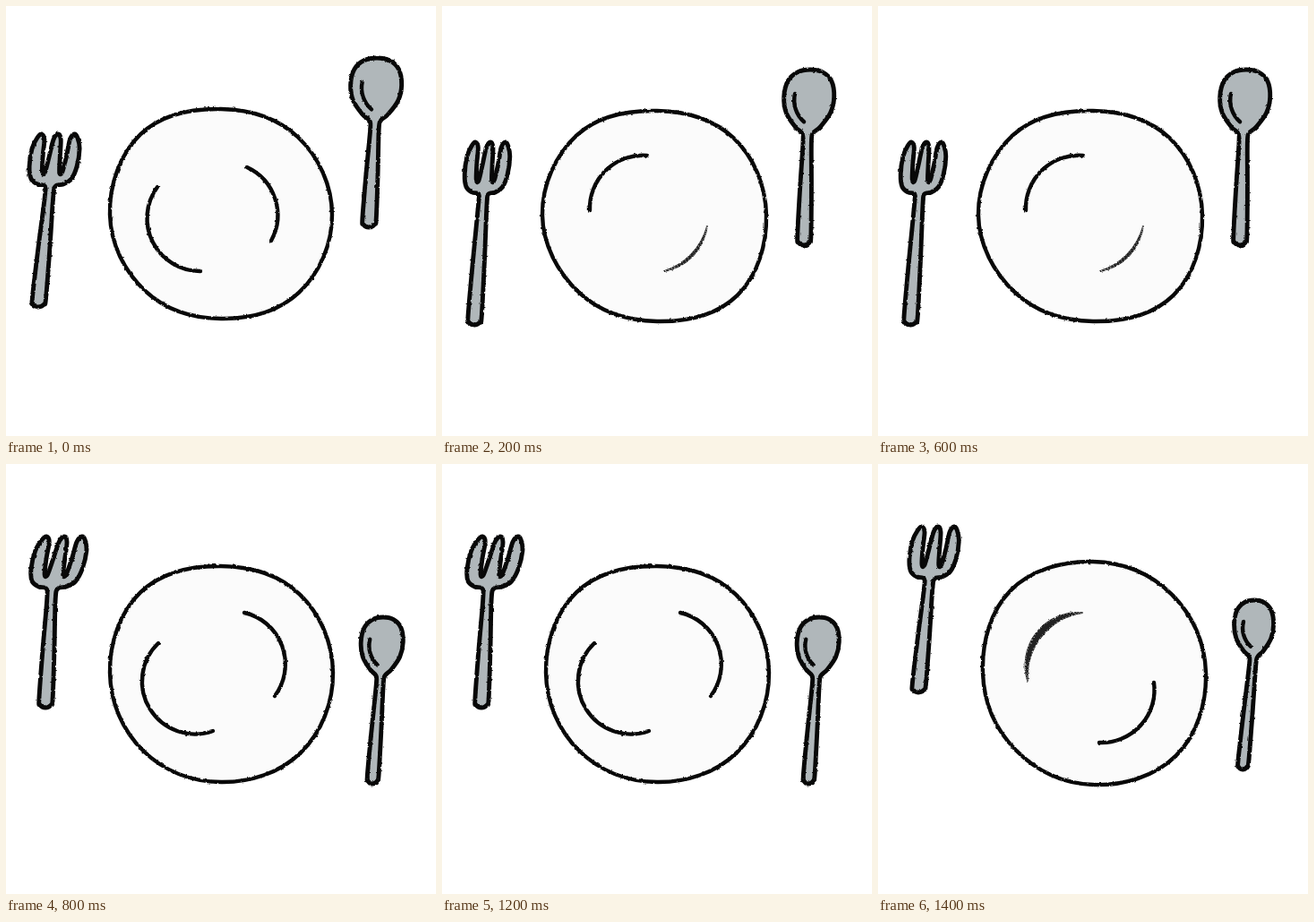
An HTML page that plays this animation: 480x480 px, repeating every 1.6 s.

```html
<!DOCTYPE html>
<html lang="en">
<head>
<meta charset="utf-8">
<title>Dinner is coming</title>
<style>
html, body { margin: 0; width: 100%; height: 100%; overflow: hidden; background: #fff; }
svg { display: block; width: 100%; height: 100%; }
path { fill: none; stroke: #080808; stroke-width: 4.4; stroke-linecap: round; stroke-linejoin: round; }
.plate { fill: #fbfbfb; }
.metal { fill: #b0b7ba; stroke-width: 4.9; }
.brush { fill: #222; stroke: #222; stroke-width: 1.8; }
.specks { stroke: #ddd; stroke-width: 1; stroke-dasharray: .2 3.4; }
</style>
</head>
<body>
<svg viewBox="0 0 480 480">
  <filter id="rough" x="0" y="0" width="480" height="480" filterUnits="userSpaceOnUse" color-interpolation-filters="sRGB">
    <feTurbulence type="fractalNoise" baseFrequency=".28" numOctaves="2" seed="4"/>
    <feDisplacementMap in="SourceGraphic" scale="2.5" xChannelSelector="R" yChannelSelector="G"/>
  </filter>
  <g id="scene" filter="url(#rough)"></g>
</svg>
<script>
const tag = (cls, d) => `<path class="${cls}" d="${d}"/>`;

// Smooth closed curve; a larger ease pulls it tighter to its points
function blob(cls, p, ease) {
  const n = p.length;
  let d = 'M' + p[0];
  for (let i = 0; i < n; i++) {
    const [a, b, c, e] = [n - 1, 0, 1, 2].map(k => p[(i + k) % n]);
    const c1 = b.map((v, k) => v + (c[k] - a[k]) / ease);
    const c2 = c.map((v, k) => v - (e[k] - b[k]) / ease);
    d += `C${c1} ${c2} ${c}`;
  }
  return tag(cls, d + 'Z');
}

// Radii go clockwise from the right, one per eighth of a turn
const plate = (...radii) => blob('plate', radii.map((r, i) => {
  const a = i * Math.PI / 4;
  return [240 + r * Math.cos(a), 233 + r * Math.sin(a)];
}), 5.34);

// Clockwise arcs: an even pen line, or a grainy crescent
const arc = (x1, y1, x2, y2, r = 59) => `M${x1},${y1}A${r},${r} 0 0 1 ${x2},${y2}`;
const pen = (...p) => tag('pen', arc(...p));
function brush(x1, y1, x2, y2) {
  const d = arc(x1, y1, x2, y2) + `A72,72 0 0 0 ${x1},${y1}`;
  return tag('brush', d) + tag('specks', d);
}

// Mirrored outline around the neck at x, y; tip and foot lean the two ends
function utensil(head, x, y, tip, foot, len, grip) {
  const top = head[head.length - 1][1];
  const side = [
    [.8 * grip, 3 - len], [grip, 10 - len], [.85 * grip, -.5 * len], [.62 * grip, -10],
    ...head.slice(0, -1)
  ];
  const mirror = side.map(([u, v]) => [-u, v]).reverse();
  const all = [[0, -len], ...side, [0, top], ...mirror];
  return blob('metal', all.map(([u, v]) =>
    [x + u + (v > 0 ? tip * v / top : -foot * v / len), y - v]), 6);
}

const tines = [[6, 2], [14, 4], [22, 10], [26, 24], [26, 44], [22, 56], [18, 60],
  [14, 54], [13, 36], [11, 18], [8, 17], [6, 34], [4, 54], [0, 60]];
const bowl = [[.22, 0], [.5, .1], [.88, .32], [1, .57], [.87, .82], [.5, .96], [0, 1]];

const fork = (x, y, tip, foot, len, spread) =>
  utensil(tines.map(([u, v]) => [u * spread, v]), x, y, tip, foot, len, 7.6);

const spoon = (x, y, tip, foot, len, w, h) =>
  utensil(bowl.map(([u, v]) => [u * w, v * h]), x, y, tip, foot, len, w * .27) +
  pen(x - .14 * w, y - .18 * h, x - .5 * w, y - .62 * h, h * .45);

const rest = plate(124, 123, 116, 120, 124, 127, 118, 122) +
  fork(49, 203, 9, -13, 133, 1.02) + spoon(412, 128, 2, -7, 119, 28.5, 70);
const sink = plate(122, 127, 119, 123, 128, 126, 116, 121) +
  fork(46, 212, 8, -10, 144, .92) + spoon(408, 142, 3, -4, 125, 28, 71);
const swap = plate(125, 126, 122, 123, 124, 127, 119, 124) +
  fork(51, 141, 14, -7, 131, 1.1) + spoon(418, 236, 3, -9, 121, 23.5, 65);
const lift = plate(126, 131, 125, 122, 123, 130, 124, 124) +
  fork(57, 130, 10, -12, 125, 1) + spoon(419, 215, 1, -12, 126, 22, 63);

const restA = rest + pen(217, 296, 169, 202) + pen(269, 180, 296, 262);
const restB = rest + pen(225, 296, 162, 231) + brush(259, 166, 301, 234);
const low = sink + pen(165, 228, 229, 167) + brush(296, 246, 248, 296);
const high = swap + pen(231, 298, 170, 200) + pen(266, 166, 300, 259);
const hop = lift + brush(167, 242, 228, 166) + pen(308, 244, 247, 311);

const steps = [restA, low, restB, low, high, hop, high, hop];
const scene = document.getElementById('scene');
let shown = -1;

function draw(now) {
  const step = Math.floor(now / 200) % steps.length;
  if (step !== shown) scene.innerHTML = steps[shown = step];
  requestAnimationFrame(draw);
}
draw(0);
</script>
</body>
</html>
```
